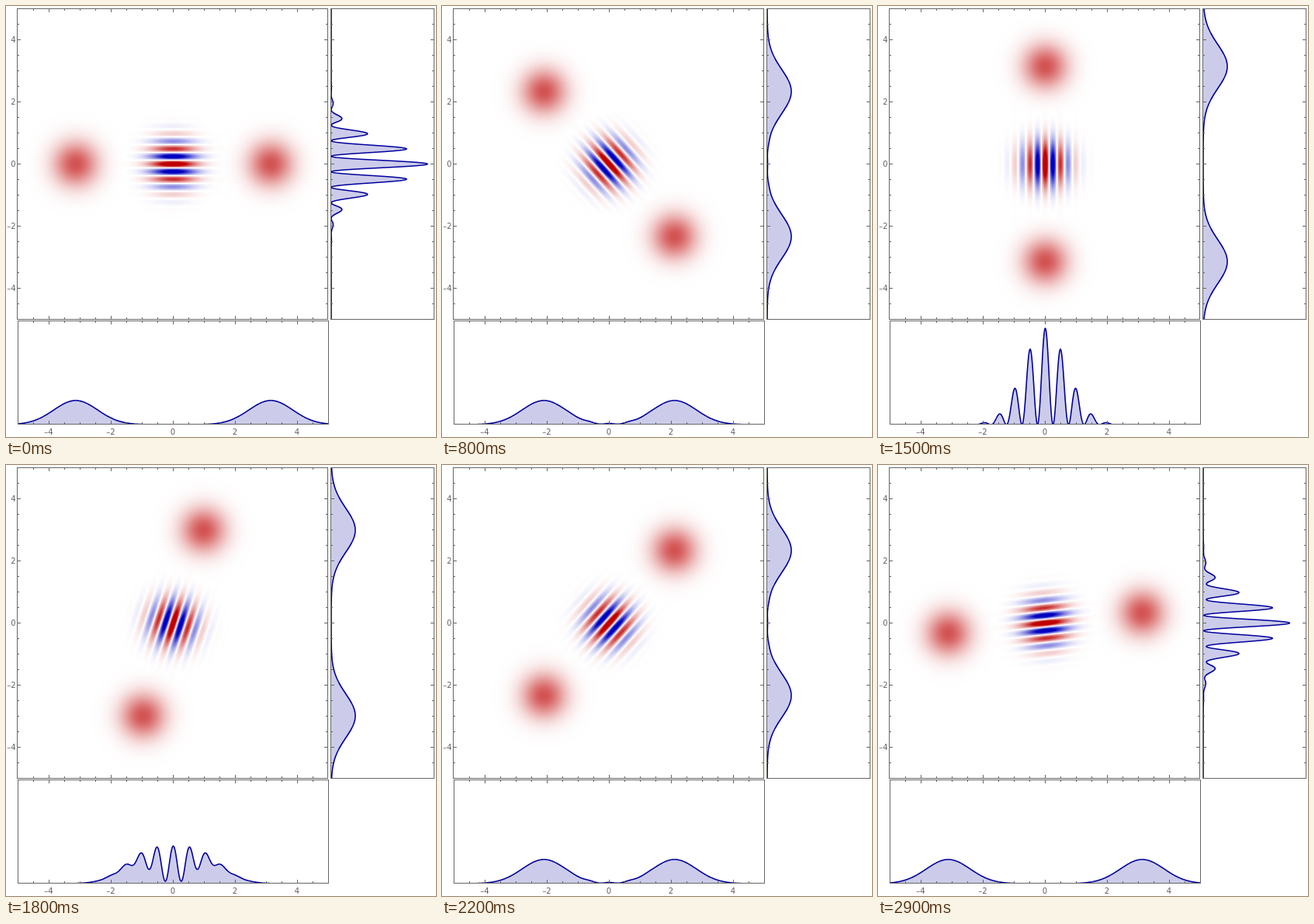
Animation of 554x555 px, one loop 3000 ms. Source, as an HTML page with a canvas:

```html
<!DOCTYPE html>
<html lang="en">
<head>
<meta charset="utf-8">
<title>Rotating two-lobe distribution</title>
<style>
  html, body { margin: 0; width: 100%; height: 100%; overflow: hidden; background: #fff; }
  canvas { display: block; }
</style>
</head>
<body>
<canvas id="stage" width="554" height="555"></canvas>
<script>
const ctx = document.getElementById('stage').getContext('2d');
const W = 554, H = 555;
const UNIT = 40, CX = 215, CY = 203;   // plot scale and origin
const RADIUS = Math.PI;                // distance of each lobe from the origin
const PEAK = 31;                       // height of a lone marginal peak
const GAIN = 1.36;                     // colour saturates above 1 / GAIN
const STEP = 100, STEPS = 30;
const GREY = '#666', BLUE = '#00009c', FILL = '#ccccea';

const gauss = (x, y) => Math.exp(-2 * (x * x + y * y));

function drawDensity(img, c, s) {
  const px = img.data, size = img.width;
  for (let j = 0, i = 0; j < size; j++) {
    const y = (CY - 3 - j) / UNIT;
    for (let k = 0; k < size; k++, i += 4) {
      const x = (k + 15 - CX) / UNIT;
      // u runs along the lobe axis, v across it
      const u = (x * c - y * s) / RADIUS, v = (x * s + y * c) / RADIUS;
      const lobes = (gauss(u - RADIUS, v) + gauss(u + RADIUS, v)) / 2;
      const fringe = gauss(u, v) * Math.cos(4 * RADIUS * v);
      const val = Math.max(-1, Math.min(1, GAIN * (lobes + fringe)));
      const a = Math.abs(val);
      const main = 255 - 65 * a, rest = 255 - 255 * a;
      px[i] = val > 0 ? main : rest;
      px[i + 1] = rest;
      px[i + 2] = val > 0 ? rest : main;
      px[i + 3] = 255;
    }
  }
  ctx.putImageData(img, 15, 3);
}

// Marginal at u for lobes at +-c, with fringe frequency set by s
function marginal(u, c, s) {
  return PEAK * (Math.exp(-((u - c) ** 2)) + Math.exp(-((u + c) ** 2)) +
    2 * Math.exp(-u * u - c * c) * Math.cos(4 * s * u));
}

function drawMarginal(c, s, box, toPoint) {
  const curve = new Path2D(), area = new Path2D();
  area.moveTo(...toPoint(-5, 0));
  for (let i = 0; i <= 800; i++) {
    const u = -5 + i / 80;
    const p = toPoint(u, marginal(u, c, s));
    if (i) curve.lineTo(...p); else curve.moveTo(...p);
    area.lineTo(...p);
  }
  area.lineTo(...toPoint(5, 0));
  ctx.save();
  ctx.beginPath();
  ctx.rect(...box);
  ctx.clip();
  ctx.fillStyle = FILL;
  ctx.fill(area);
  ctx.strokeStyle = BLUE;
  ctx.lineWidth = 1.6;
  ctx.lineJoin = 'round';
  ctx.stroke(curve);
  ctx.restore();
}

function ticks(draw) {
  for (let n = -9; n <= 9; n++) draw(n / 2, n % 4 ? 2 : 4);
}

function xTicks(top, bottom) {
  ticks((u, len) => {
    const x = Math.round(CX + u * UNIT);
    ctx.fillRect(x, top + 1, 1, len);
    ctx.fillRect(x, bottom - len, 1, len);
  });
}

function yTicks(left, right) {
  ticks((u, len) => {
    const y = Math.round(CY - u * UNIT);
    ctx.fillRect(left + 1, y, len, 1);
    ctx.fillRect(right - len, y, len, 1);
  });
}

function frame(left, top, right, bottom) {
  ctx.strokeRect(left + .5, top + .5, right - left, bottom - top);
}

function drawAxes() {
  ctx.strokeStyle = ctx.fillStyle = GREY;
  ctx.lineWidth = 1;
  frame(14, 3, 414, 403);
  frame(418, 3, 551, 403);
  frame(15, 405, 415, 538);
  xTicks(3, 403);
  yTicks(14, 414);
  yTicks(418, 551);
  xTicks(405, 538);

  ctx.font = '10px "DejaVu Sans", sans-serif';
  for (let n = -4; n <= 4; n += 2) {
    const label = (n < 0 ? '\u2013' : '') + Math.abs(n);
    ctx.fillStyle = '#666';
    ctx.textAlign = 'right';
    ctx.fillText(label, 12.5, CY - n * UNIT + 4);
    ctx.fillStyle = '#70586c';
    ctx.textAlign = 'center';
    ctx.fillText(label, CX + n * UNIT, 552);
  }
}

const density = ctx.createImageData(399, 400);

function render(step) {
  const angle = Math.PI * step / STEPS;
  const c = RADIUS * Math.cos(angle), s = RADIUS * Math.sin(angle);
  ctx.fillStyle = '#fff';
  ctx.fillRect(0, 0, W, H);
  drawDensity(density, c, s);
  drawMarginal(c, s, [15, 405, 401, 134], (u, h) => [CX + .5 + u * UNIT, 539 - h]);
  drawMarginal(s, c, [418, 3, 134, 401], (u, h) => [419 + h, CY + .5 - u * UNIT]);
  drawAxes();
}

const start = performance.now();
let shown = -1;

function tick(now) {
  const step = Math.floor(Math.max(0, now - start) / STEP) % STEPS;
  if (step !== shown) render(shown = step);
  requestAnimationFrame(tick);
}

tick(start);
</script>
</body>
</html>
```
